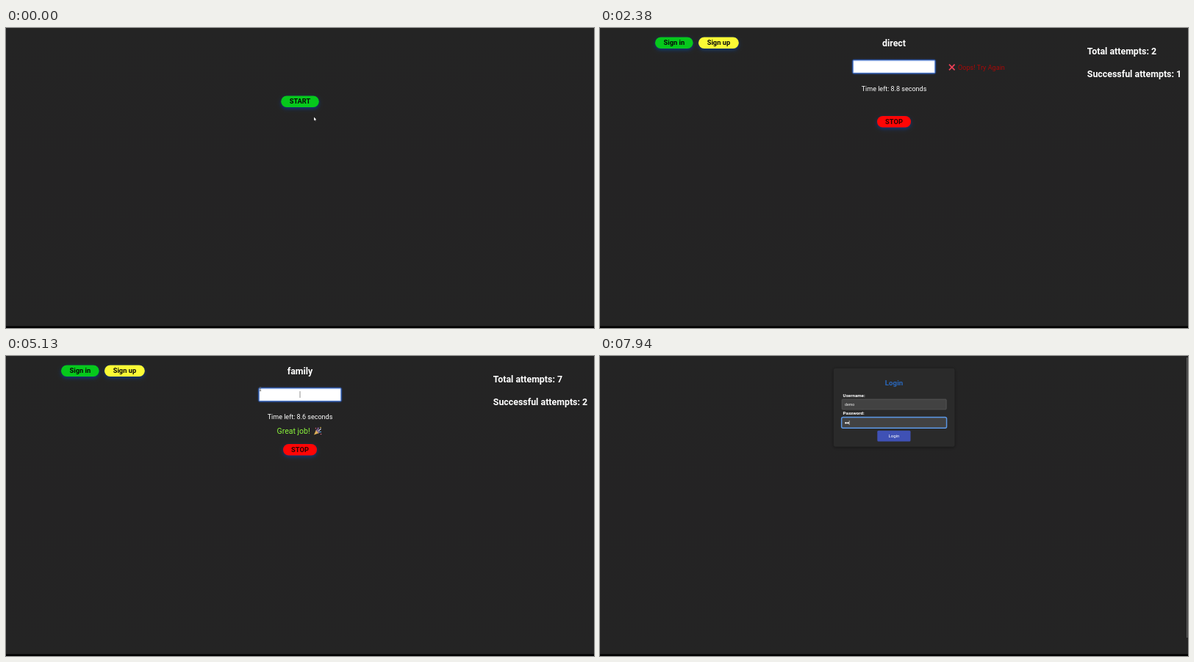
An HTML page with a canvas that plays this animation: 800 by 409 pixels, repeating every 8 s.

```html
<!DOCTYPE html>
<html lang="en">
<head>
<meta charset="utf-8">
<title>Typing game</title>
<style>
  html, body { margin: 0; width: 100%; height: 100%; overflow: hidden; background: #242424; }
  canvas { display: block; width: 800px; height: 409px; }
</style>
</head>
<body>
<canvas id="stage"></canvas>
<script>
const W = 800, H = 409, LOOP = 8000;
const canvas = document.getElementById('stage');
const ctx = canvas.getContext('2d');
const dpr = window.devicePixelRatio || 1;
canvas.width = W * dpr;
canvas.height = H * dpr;

// Moments of the session, in ms
const START = 430, FIRST_HIT = 1010, SECOND_HIT = 4150, LOGIN = 5690;
const MISSES = [2380, 2620, 2860, 3080, 3310];
const OOPS_END = 3430;
const BLINKS = [START, 1820, 3310, 4600];
const USER_FOCUS = 6500, PASS_FOCUS = 7260;
const USER_KEYS = [6750, 6820, 6880, 7060];
const PASS_KEYS = [7810, 7930];
const TICK = 108;

const countPast = (times, t) => times.filter(m => m <= t).length;
const last = (times, t) => times.filter(m => m <= t).pop();

function text(str, x, y, size, color, weight = 400, align = 'center') {
  ctx.font = `${weight} ${size}px Roboto, sans-serif`;
  ctx.textAlign = align;
  ctx.fillStyle = color;
  ctx.fillText(str, x, y);
}

function box(x, y, w, h, r, fill, stroke, line = 1) {
  ctx.beginPath();
  ctx.roundRect(x, y, w, h, r);
  if (fill) { ctx.fillStyle = fill; ctx.fill(); }
  if (stroke) { ctx.strokeStyle = stroke; ctx.lineWidth = line; ctx.stroke(); }
}

function shadow(color, blur, dy, draw) {
  ctx.save();
  ctx.shadowColor = color;
  ctx.shadowBlur = blur * dpr;
  ctx.shadowOffsetY = dy * dpr;
  draw();
  ctx.restore();
}

function poly(points, fill) {
  ctx.beginPath();
  points.forEach(([x, y]) => ctx.lineTo(x, y));
  ctx.closePath();
  ctx.fillStyle = fill;
  ctx.fill();
}

function dot(x, y, r, fill) {
  ctx.beginPath();
  ctx.arc(x, y, r, 0, Math.PI * 2);
  ctx.fillStyle = fill;
  ctx.fill();
}

function line(x1, y1, x2, y2, color, width) {
  ctx.beginPath();
  ctx.moveTo(x1, y1);
  ctx.lineTo(x2, y2);
  ctx.strokeStyle = color;
  ctx.lineWidth = width;
  ctx.stroke();
}

function pill(label, x, y, w, fill, color = '#080808') {
  shadow('rgba(0, 70, 190, 0.55)', 5, 2, () => box(x, y, w, 15.4, 7.7, fill));
  text(label, x + w / 2, y + 10.9, 9.3, color, 700);
}

function background() {
  const g = ctx.createLinearGradient(0, 0, 0, H);
  g.addColorStop(0, '#242424');
  g.addColorStop(0.5, '#242324');
  g.addColorStop(1, '#242424');
  ctx.fillStyle = g;
  ctx.fillRect(0, 0, W, H);
  ctx.fillStyle = '#000';
  ctx.fillRect(0, 406.5, W, 2.5);
}

function medal(x, y) {
  poly([[x - 4.5, y - 5], [x - 1.5, y - 5], [x + 1.5, y], [x - 2, y + 1]], '#4a90d0');
  poly([[x + 4.5, y - 5], [x + 1.5, y - 5], [x - 1.5, y], [x + 2, y + 1]], '#d84b50');
  poly([[x - 2, y - 5], [x + 2, y - 5], [x, y - 1]], '#e8e4e4');
  dot(x, y + 2, 3.4, '#e9a83a');
  dot(x, y + 2, 2, '#f8d36b');
}

function popper(x, y) {
  poly([[x - 5, y + 5], [x - 2, y - 2], [x + 2, y + 2.5]], '#dcae55');
  line(x - 2, y - 2, x + 2, y + 2.5, '#8b6c94', 1.6);
  line(x, y - 1, x + 1, y - 5, '#a77bd0', 1.1);
  line(x + 1, y, x + 4.5, y - 3.5, '#d8d8e4', 1.1);
  line(x + 2, y + 1, x + 5, y + 1, '#5b9bd8', 1.1);
  dot(x - 2.5, y - 4, 0.8, '#e0627a');
  dot(x + 4, y - 5, 0.8, '#e3bc4a');
  dot(x + 4.5, y + 4, 0.8, '#d66b8a');
}

function arrow(x, y) {
  poly([[x, y], [x, y + 4.6], [x + 1.1, y + 3.7], [x + 1.9, y + 5.2],
        [x + 2.6, y + 4.8], [x + 1.9, y + 3.4], [x + 3.2, y + 3.3]], '#f4f4f4');
}

function beam(x, y, color) {
  line(x, y - 2.5, x, y + 2.5, color, 0.8);
  line(x - 1.2, y - 2.5, x + 1.2, y - 2.5, color, 0.7);
  line(x - 1.2, y + 2.5, x + 1.2, y + 2.5, color, 0.7);
}

// Eased position along [time, x, y] stops
function along(stops, t) {
  if (t <= stops[0][0]) return stops[0].slice(1);
  for (let i = 1; i < stops.length; i++) {
    const [t0, x0, y0] = stops[i - 1], [t1, x1, y1] = stops[i];
    if (t < t1) {
      const p = (t - t0) / (t1 - t0), e = p * p * (3 - 2 * p);
      return [x0 + (x1 - x0) * e, y0 + (y1 - y0) * e];
    }
  }
  return stops[stops.length - 1].slice(1);
}

const TO_START = [[60, 419, 121.5], [330, 405, 101]];
const TO_SIGN_IN = [[4940, 402, 102], [5130, 346, 45], [5500, 103, 21]];
const TO_FIELD = [[5720, 103, 21], [5940, 324, 50], [6310, 340, 66]];

function intro(t) {
  pill('START', 374.2, 92.5, 51.6, '#06c81c');
  arrow(...along(TO_START, t));
}

function typedWord(t) {
  if (t < FIRST_HIT) return 'window'.slice(0, Math.max(0, Math.floor((t - 500) / 75)));
  if (t > 3560 && t < SECOND_HIT) return 'direct'.slice(0, Math.floor((t - 3500) / 90));
  return '';
}

function game(t) {
  const hits = countPast([FIRST_HIT, SECOND_HIT], t);
  const total = hits + countPast(MISSES, t);
  const begin = [START, FIRST_HIT, SECOND_HIT][hits];
  const limit = [10, 10, 9.5][hits];
  const left = limit - Math.floor((t - begin) / TICK) / 10;

  pill('Sign in', 75, 12.5, 51.6, '#06c81c');
  pill('Sign up', 134, 12.5, 54.8, '#fbfb35');
  text(['window', 'direct', 'family'][hits], 400, 24.6, 12.4, '#fff', 700);
  text(`Total attempts: ${total}`, 662.8, 36.3, 12.4, '#fff', 700, 'left');
  text(`Successful attempts: ${hits}`, 662.8, 66.5, 12.4, '#fff', 700, 'left');

  shadow('rgba(40, 100, 220, 0.7)', 2, 0, () =>
    box(344, 43.8, 112, 18, 1, '#fff', '#2f5fb8', 1));
  const typed = typedWord(t);
  text(typed, 400, 56, 9, '#222');
  if ((t - last(BLINKS, t)) % 1080 < 540) {
    const x = 400 + (typed ? ctx.measureText(typed).width / 2 + 0.5 : 0);
    line(x, 48, x, 57, '#777', 0.8);
  }

  text(`Time left: ${left.toFixed(1)} seconds`, 400, 85.6, 9, '#fff');
  if (hits === 1 && t < MISSES[0]) {
    text('Nice work!', 366.5, 106.3, 10.5, '#8cf53c', 400, 'left');
    medal(426, 102.5);
  }
  if (hits === 2) {
    text('Great job!', 368.6, 106.3, 10.5, '#8cf53c', 400, 'left');
    popper(424, 102.5);
  }
  if (t >= MISSES[0] && t < OOPS_END) {
    line(475, 49.7, 482.6, 57.4, '#ee4058', 1.7);
    line(482.6, 49.7, 475, 57.4, '#ee4058', 1.7);
    text('Oops! Try Again', 487, 56.8, 9.1, '#a90808', 400, 'left');
  }
  pill('STOP', 377, 120, 46, '#fe0505', '#2b0303');

  if (t >= 4940) {
    const [x, y] = along(TO_SIGN_IN, t);
    const inField = x > 344 && x < 456 && y > 44 && y < 62;
    if (inField) beam(x, y, '#555');
    else arrow(x, y);
  }
}

function field(y, filled, focused) {
  box(329.2, y, 142, 13.8, 1, '#424242', '#5a5a5a', 0.8);
  if (!filled) {
    ctx.fillStyle = '#b5343c';
    ctx.fillRect(329, y, 2, 13.8);
  }
  if (focused) box(328.6, y - 0.5, 143, 14.8, 2, null, '#5a97e6', 1.4);
}

function caret(x, y, since) {
  if (since % 1080 < 540) line(x, y, x, y + 6, '#eee', 0.6);
}

function login(t) {
  const user = 'demo'.slice(0, countPast(USER_KEYS, t));
  const dots = countPast(PASS_KEYS, t);
  const onUser = t >= USER_FOCUS && t < PASS_FOCUS, onPass = t >= PASS_FOCUS;

  shadow('rgba(0, 0, 0, 0.45)', 4, 0.8, () => box(317.8, 16.8, 164.8, 107, 3, '#2a2a2a'));
  text('Login', 400, 40.2, 9.7, '#2a68bd', 700);
  text('Username:', 330.6, 55.6, 6.2, '#fff', 700, 'left');
  text('Password:', 330.6, 80.4, 6.2, '#fff', 700, 'left');
  field(59, user.length > 0, onUser);
  field(84, dots > 0, onPass);

  text(user, 333, 68, 5.2, '#eee', 400, 'left');
  if (onUser) {
    const since = t - (last(USER_KEYS, t) || USER_FOCUS);
    caret(333.4 + ctx.measureText(user).width, 63, since);
  }
  for (let i = 0; i < dots; i++) dot(334.5 + i * 3, 91.2, 1.2, '#f2f2f2');
  if (onPass) caret(333.4 + dots * 2.9, 88, t - (last(PASS_KEYS, t) || PASS_FOCUS));

  box(377.3, 101.8, 45.2, 14.7, 1.5, dots ? '#3f51b5' : '#c9c9c9');
  text('Login', 400, 111.4, 6, dots ? '#fff' : '#777');

  ctx.fillStyle = '#6c6c6c';
  ctx.fillRect(798.2, 2, 1.2, 382);

  if (t < USER_FOCUS) {
    const [x, y] = along(TO_FIELD, t);
    if (x > 330 && y > 59) beam(x, y, '#ddd');
    else arrow(x, y);
  }
}

function draw(now) {
  const t = now % LOOP;
  ctx.setTransform(dpr, 0, 0, dpr, 0, 0);
  background();
  if (t < START) intro(t);
  else if (t < LOGIN) game(t);
  else login(t);
}

let origin;
function frame(now) {
  origin ??= now;
  draw(now - origin);
  requestAnimationFrame(frame);
}
requestAnimationFrame(frame);
</script>
</body>
</html>
```
